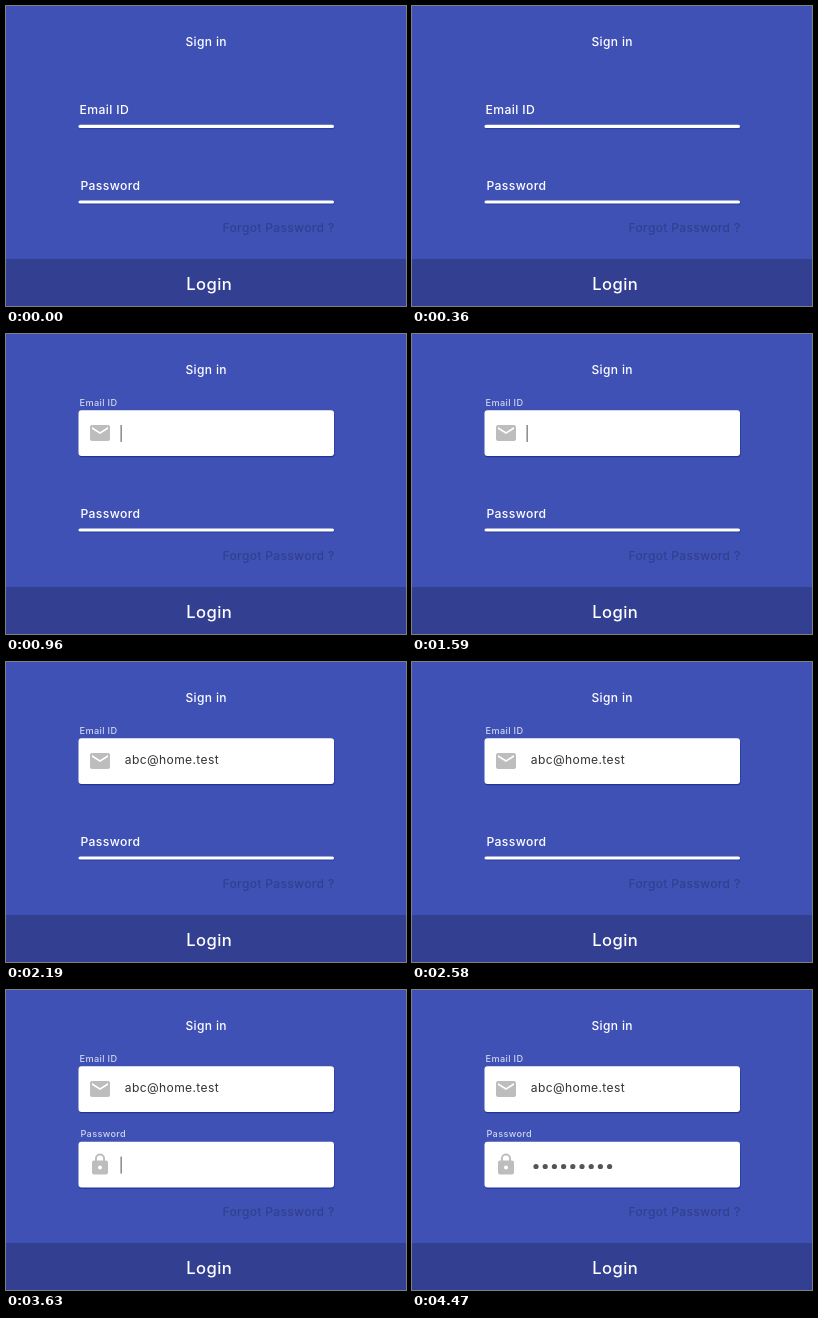
Write an HTML page that moves like this. It is 400 px wide and 300 px high and loops after 4800 ms.

```html
<!DOCTYPE html>
<html lang="en">
<head>
<meta charset="utf-8">
<title>Sign in</title>
<style>
  html, body { margin: 0; width: 100%; height: 100%; overflow: hidden; background: #3f51b5; }
  svg { display: block; width: 400px; height: 300px; font: 500 12px Inter, "Open Sans", sans-serif; letter-spacing: .03em; fill: #fff; }
  .icon { fill: #bdbdbd; }
  .value { font-weight: 400; font-size: 12.1px; fill: #333; }
  .dots { fill: #555; }
  .caret { fill: #777; }
  .shadow { fill: #24339a; }
</style>
</head>
<body>
<svg viewBox="0 0 400 300">
  <rect width="400" height="300" fill="#3f51b5"/>
  <text x="200.2" y="40" text-anchor="middle">Sign in</text>
  <g id="email">
    <text class="label" x="73.6">Email ID</text>
    <rect class="shadow" x="72.8" width="255.8" rx="3"/>
    <rect class="box" x="72.5" width="255.5"/>
    <path class="icon" transform="translate(82 87)" d="M20 4H4c-1.1 0-2 .9-2 2v12c0 1.1.9 2 2 2h16c1.1 0 2-.9 2-2V6c0-1.1-.9-2-2-2zm0 4l-8 5-8-5V6l8 5 8-5z"/>
    <text class="value" x="118.8" y="102"></text>
    <rect class="caret" y="91" width="1.3" height="17"/>
  </g>
  <g id="password" transform="translate(0 75.6)">
    <text class="label" x="74.4">Password</text>
    <rect class="shadow" x="72.8" width="255.8" rx="3"/>
    <rect class="box" x="72.5" width="255.5"/>
    <path class="icon" transform="translate(82 87)" fill-rule="evenodd" d="M18 8h-1V6A5 5 0 0 0 7 6v2H6c-1.1 0-2 .9-2 2v10c0 1.1.9 2 2 2h12c1.1 0 2-.9 2-2V10c0-1.1-.9-2-2-2zM12 17a2 2 0 1 1 0-4 2 2 0 0 1 0 4zM15.1 8H8.9V6a3.1 3.1 0 0 1 6.2 0z"/>
    <g class="dots"></g>
    <rect class="caret" y="91" width="1.3" height="17"/>
  </g>
  <text x="216.5" y="225.5" fill="#31408f">Forgot Password ?</text>
  <rect y="253" width="400" height="47" fill="#334092"/>
  <text x="203.2" y="284" text-anchor="middle" font-size="16.6">Login</text>
</svg>
<script>
const LOOP = 4800, EMAIL = "abc@home.test", DOTS = 9;
const clamp = v => Math.min(1, Math.max(0, v));
const mix = (a, b, p) => a + (b - a) * p;
const set = (el, attrs) => { for (const k in attrs) el.setAttribute(k, attrs[k]); };

const dots = document.querySelector(".dots");
for (let i = 0; i < DOTS; i++) {
  const dot = document.createElementNS("http://www.w3.org/2000/svg", "circle");
  set(dot, { cx: 124 + i * 9.2, cy: 100.9, r: 2.6 });
  dots.append(dot);
}

const value = document.querySelector(".value");
function typeEmail(n) {
  value.textContent = EMAIL.slice(0, n);
  return 120 + value.getComputedTextLength();
}
function typeDots(n) {
  [...dots.children].forEach((dot, i) => set(dot, { visibility: i < n ? "visible" : "hidden" }));
  return 120 + n * 9.2;
}

const fields = [
  { id: "email", open: 660, type: 1770, count: EMAIL.length, write: typeEmail },
  { id: "password", open: 2790, type: 3960, count: DOTS, write: typeDots }
];
for (const f of fields)
  for (const part of ["label", "shadow", "box", "icon", "caret"])
    f[part] = document.querySelector(`#${f.id} .${part}`);

function drawField(f, t) {
  const u = clamp((t - f.open) / 300), p = u * u * (3 - 2 * u);
  const top = mix(118.8, 76.2, p), height = 122 - top;
  set(f.label, { y: mix(108.3, 71.5, p), "font-size": mix(12.2, 9.15, p), opacity: mix(1, 0.75, p) });
  set(f.box, { y: top, height, rx: mix(1.6, 3, p) });
  set(f.shadow, { y: top + 1.2, height, rx: mix(1.6, 3, p), opacity: mix(0.6, 1, p) });
  set(f.icon, { opacity: clamp((p - 0.6) / 0.4) });

  // Typing advances in seven steps; the caret blinks until then.
  const step = t < f.type ? 0 : Math.min(7, 1 + Math.floor((t - f.type) / 70));
  const end = f.write(Math.round(f.count * step / 7));
  const since = t - f.open - 270;
  const lit = step ? step < 7 : since >= 0 && since % 540 < 270;
  set(f.caret, { x: step ? end : 114.5, visibility: lit ? "visible" : "hidden" });
}

function draw() {
  const t = performance.now() % LOOP;
  fields.forEach(f => drawField(f, t));
  requestAnimationFrame(draw);
}
draw();
</script>
</body>
</html>
```
